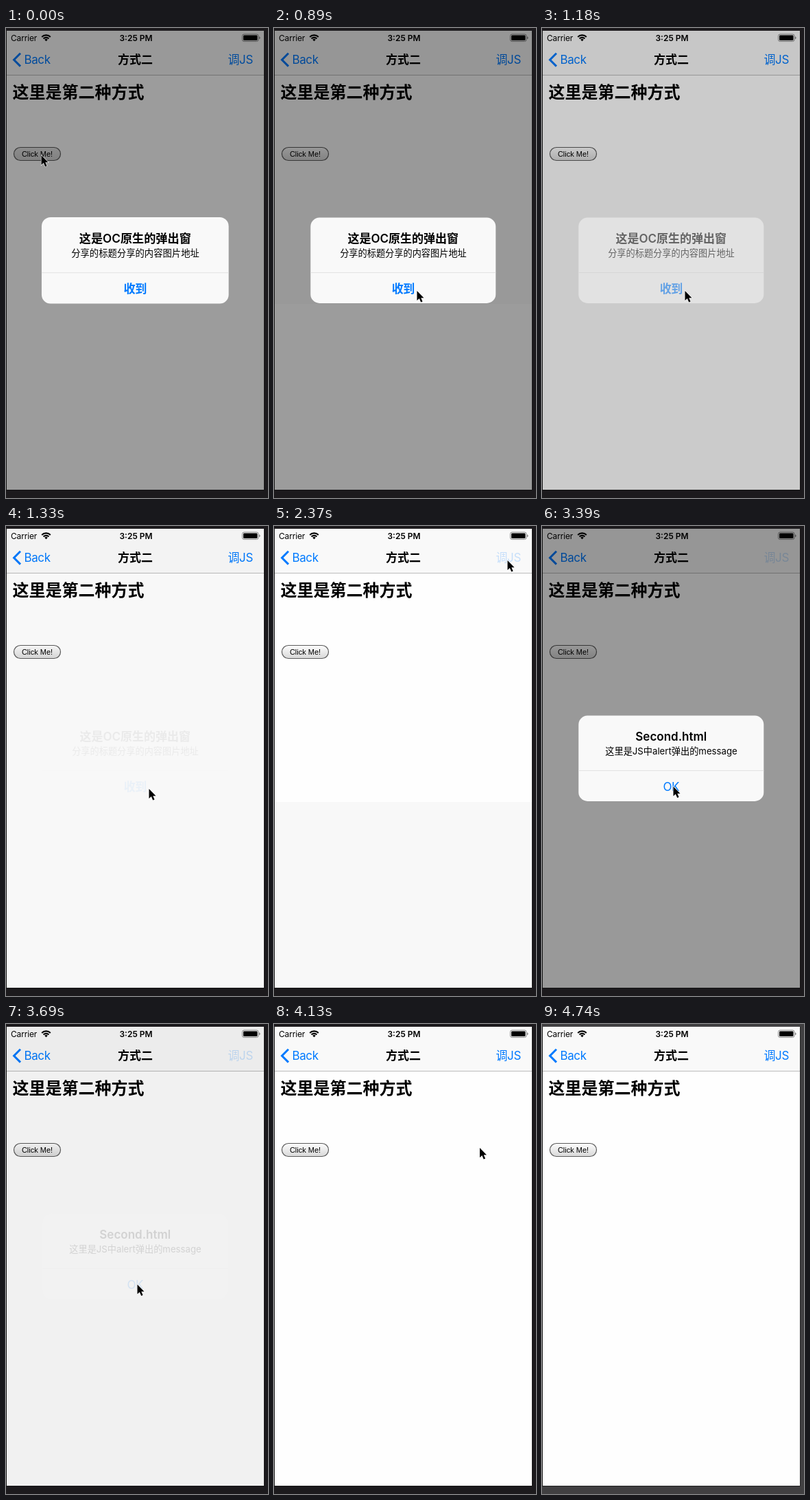
An HTML page for the animation above (4840 ms loop, 382 by 683 pixels).

```html
<!DOCTYPE html>
<html lang="zh-CN">
<head>
<meta charset="utf-8">
<title>Native alert demo</title>
<style>
  html, body { margin: 0; width: 100%; height: 100%; overflow: hidden; background: #1c1a1d; }
  svg { display: block; width: 382px; height: 683px; }
  text { font-family: Inter, "Noto Sans CJK SC", "Noto Sans CJK", sans-serif; font-size: 17px; }
  .mid { text-anchor: middle; }
  .bold { font-weight: 600; }
  .blue { fill: #007aff; letter-spacing: -.4px; }
  .msg { font-size: 13.2px; }
  .status { font-size: 12px; }
</style>
</head>
<body>
<svg viewBox="0 0 382 683">
  <defs>
    <linearGradient id="up" x2="0" y2="1">
      <stop offset="0" stop-color="#fdfdfd"/><stop offset="1" stop-color="#d8d8d8"/>
    </linearGradient>
    <linearGradient id="down" x2="0" y2="1">
      <stop offset="0" stop-color="#e6e6e6"/><stop offset="1" stop-color="#d2d2d2"/>
    </linearGradient>
  </defs>
  <rect id="desk" width="382" height="683"/>
  <rect x="0" y="4" width="376.5" height="667.7" fill="#111"/>
  <rect x="1" y="4" width="375" height="667" fill="#fefefe"/>

  <rect x="1" y="4" width="375" height="64" fill="#f9f9f9"/>
  <rect x="1" y="68" width="375" height="1" fill="#bcbcbc"/>
  <text class="status" x="7" y="18.5" letter-spacing="-.15">Carrier</text>
  <g fill="none" stroke="#000" stroke-width="2.1">
    <path d="M52.2 13 A8.8 8.8 0 0 1 64.8 13"/>
    <path d="M54.6 15.5 A5.5 5.5 0 0 1 62.4 15.5"/>
  </g>
  <path d="M58.5 19.2 L56.3 16.9 A3.2 3.2 0 0 1 60.7 16.9Z"/>
  <text class="status mid bold" x="189.5" y="18.5">3:25 PM</text>
  <rect x="344.5" y="9" width="23.5" height="10.5" rx="2.6" fill="none" stroke="#8a8a8a"/>
  <rect x="346" y="10.5" width="20.5" height="7.5" rx="1.2"/>
  <path d="M369 12.3 Q370.6 13 370.6 14.3 T369 16.3Z" fill="#8a8a8a"/>

  <path d="M21 36.8 L11.6 46.2 L21 55.6" fill="none" stroke="#007aff" stroke-width="3"/>
  <text class="blue" x="26.5" y="52">Back</text>
  <text class="mid bold" x="188.5" y="52.4">方式二</text>
  <text id="action" class="blue" x="323.5" y="52.2">调JS</text>

  <text x="9.5" y="102.4" style="font-size:24px;font-weight:700">这里是第二种方式</text>
  <rect id="button" x="11.5" y="173.5" width="68" height="19" rx="9.5" stroke="#5c5c5c" stroke-width="1.2"/>
  <text class="mid" x="45.5" y="187" style="font:11px 'Liberation Sans',Arial,sans-serif">Click Me!</text>

  <rect id="shadeTop" x="1" y="4" width="375" height="397"/>
  <rect id="shadeLow" x="1" y="401" width="375" height="270"/>

  <g id="alert">
    <rect x="53.3" y="275.6" width="270" height="124.3" rx="13" fill="#f9f9f9"/>
    <rect x="53.3" y="355" width="270" height="1" fill="#e2e2e2"/>
    <text id="head" class="mid bold" x="188.3" y="311.8"></text>
    <text id="body" class="mid msg" x="188.5" y="332"></text>
    <text id="confirm" class="mid blue" x="188.3" y="384.6"></text>
  </g>

  <path id="cursor" d="M0 0 V14 L3.3 11 L5.7 16.4 L8.1 15.4 L5.8 10.2 H10Z" stroke="#fff" stroke-width="1.1" paint-order="stroke"/>
</svg>
<script>
const LOOP = 4840;
const CENTER = [188.3, 337.8];
const ALERTS = {
  native: ['这是OC原生的弹出窗', '分享的标题分享的内容图片地址', '收到', 600],
  script: ['Second.html', '这里是JS中alert弹出的message', 'OK', 400]
};
const FIRST = {
  at: [51.5, 185], top: .39, low: .39, alert: 1, scale: 1.01,
  kind: 'native', tint: 1, pressed: true, desk: '#1c1a1d'
};

// Each cue holds only what changes from then on.
const CUES = [
  [150, { scale: 1, at: [62, 198] }],
  [300, { pressed: false, at: [98, 243] }],
  [450, { top: .4, at: [146, 304] }],
  [600, { at: [185, 353] }],
  [740, { at: [203, 376] }],
  [890, { at: [208.5, 382] }],
  [1180, { alert: .5, top: .2, low: .2 }],
  [1330, { alert: .05, top: .024, low: .024 }],
  [1480, { alert: 0, top: 0, at: [222, 351] }],
  [1630, { at: [262, 248] }],
  [1770, { at: [307, 133] }],
  [1920, { at: [333, 68] }],
  [2070, { at: [340.5, 50] }],
  [2370, { tint: .2 }],
  [2510, { kind: 'script', alert: .9, scale: 1.05, top: .34, low: .34 }],
  [2660, { alert: 1, scale: 1.005, top: .4, low: .4 }],
  [2810, { scale: 1, at: [322, 90] }],
  [2960, { at: [270, 204] }],
  [3100, { at: [221, 312] }],
  [3250, { at: [196, 368] }],
  [3390, { at: [191.5, 378.5] }],
  [3690, { alert: .12, top: .05, low: .05 }],
  [3840, { alert: 0, top: 0, low: 0, tint: 1 }],
  [3990, { at: [218, 330] }],
  [4130, { at: [300, 180] }],
  [4280, { at: [400, -30] }],
  [4740, { desk: '#414042' }]
];

const el = id => document.getElementById(id);
const set = (id, name, value) => el(id).setAttribute(name, value);

function stateAt(t) {
  const state = { ...FIRST };
  for (const [time, change] of CUES) if (t >= time) Object.assign(state, change);
  return state;
}

function draw(s) {
  const [cx, cy] = CENTER;
  const [head, body, confirm, weight] = ALERTS[s.kind];
  set('desk', 'fill', s.desk);
  set('shadeTop', 'opacity', s.top);
  set('shadeLow', 'opacity', s.low);
  set('action', 'opacity', s.tint);
  set('button', 'fill', s.pressed ? 'url(#down)' : 'url(#up)');
  set('alert', 'opacity', s.alert);
  set('alert', 'transform', `translate(${cx} ${cy}) scale(${s.scale}) translate(${-cx} ${-cy})`);
  el('head').textContent = head;
  el('body').textContent = body;
  el('confirm').textContent = confirm;
  set('confirm', 'font-weight', weight);
  set('cursor', 'transform', `translate(${s.at})`);
}

function tick() {
  draw(stateAt(performance.now() % LOOP));
  requestAnimationFrame(tick);
}
tick();
</script>
</body>
</html>
```
